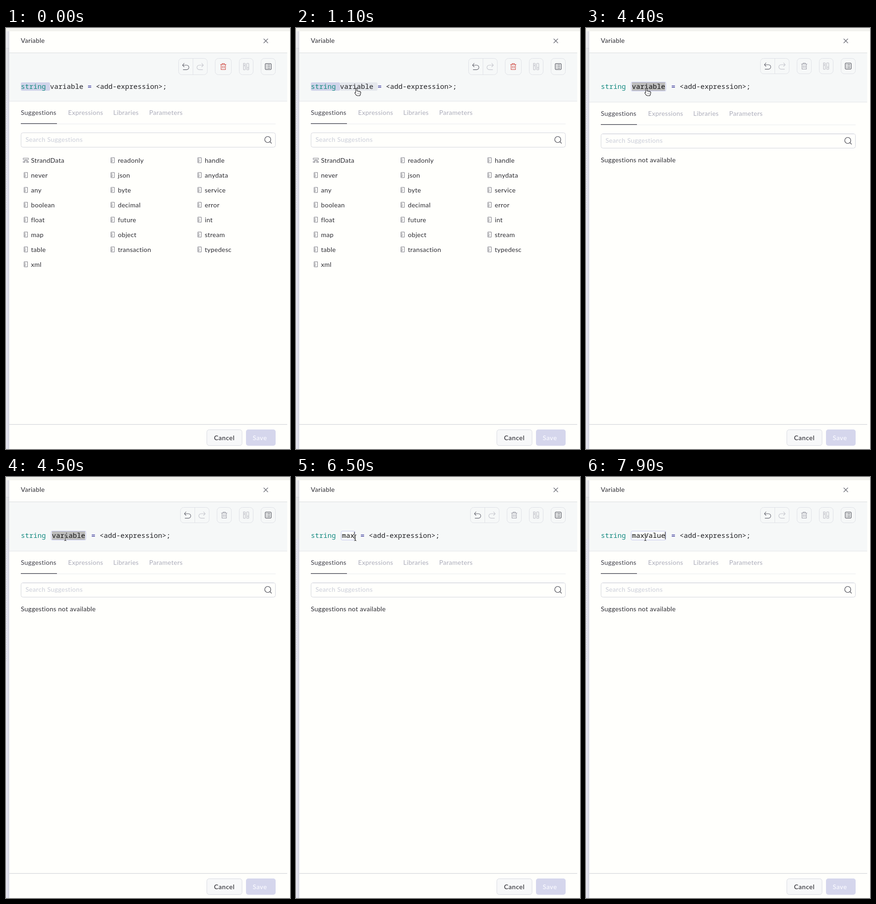
An HTML page for the animation above (8 s loop, 613 px wide and 906 px high).

```html
<!DOCTYPE html>
<html lang="en">
<head>
<meta charset="utf-8">
<title>Variable form</title>
<style>
  html, body { margin: 0; width: 100%; height: 100%; overflow: hidden; background: #fffffc; }
  svg { display: block; width: 100%; height: 100%; }
  text { font: 14px Lato, sans-serif; letter-spacing: .3px; white-space: pre; }
  .code { font: 15px "Noto Sans Mono", monospace; letter-spacing: 0; }
  .btn { font-weight: 500; letter-spacing: .5px; }
</style>
</head>
<body>
<svg id="stage" viewBox="0 0 613 906" xmlns="http://www.w3.org/2000/svg"></svg>
<script>
const LOOP = 8000;
const CELL = 9;
const stage = document.getElementById('stage');
const INK = '#2d2d33', NAVY = '#1c1a8c', TEAL = '#148a80';

const rect = (x, y, w, h, fill, extra = '') =>
  `<rect x="${x}" y="${y}" width="${w}" height="${h}" fill="${fill}" ${extra}/>`;
const frame = (x, y, w, h, r, fill, stroke) =>
  rect(x + .5, y + .5, w - 1, h - 1, fill, `rx="${r}" stroke="${stroke}"`);
const label = (x, y, s, fill = INK, cls = '') =>
  `<text x="${x}" y="${y}" fill="${fill}" class="${cls}">${s.replace(/</g, '&lt;')}</text>`;
const code = (x, y, s, fill = '#222226') => label(x, y, s, fill, 'code');
const path = (d, stroke, width = 1, fill = 'none') =>
  `<path d="${d}" stroke="${stroke}" stroke-width="${width}" fill="${fill}" stroke-linecap="round" stroke-linejoin="round"/>`;
const at = (x, y, s) => `<g transform="translate(${x} ${y})">${s}</g>`;

const typeNames = ('StrandData readonly handle never json anydata any byte service boolean decimal error ' +
  'float future int map object stream table transaction typedesc xml').split(' ');
const columns = [54, 241.5, 429];
const tabs = [[32, 'Suggestions'], [134, 'Expressions'], [231.5, 'Libraries'], [309, 'Parameters']];

const typeIcon = path('M-3.5-5.5h7v11h-7zM-3.5-2.5h2.5M-3.5 .5h3.5M-3.5 3h2.5', '#777780');
const recordIcon = path('M-5.5-4.5h11v3h-11zM0-1.5v2M-3.5 2.5v-1.500h7v1.500M-5.5 2.500h3.500v2.500h-3.500zM2 2.500h3.500v2.500h-3.500z', '#777780', .9);
const undoIcon = path('M-3.500-7l-3.500 4 3.500 3.500M-6.500-3H2a4.800 4.800 0 0 1 0 9.600H-5.500', 'currentColor', 1.1);
const trashIcon = path('M-6-4.500H6M-2.500-4.500v-2h5v2M-4.700-4.500v11h9.400v-11M-1.700-1.500v5M1.700-1.500v5', 'currentColor', 1.1);
const pairIcon = path('M-5.500-7h3a1 1 0 0 1 1 1v12a1 1 0 0 1-1 1h-2a1 1 0 0 1-1-1zM2.500-7h2.500a1 1 0 0 1 1 1v12a1 1 0 0 1-1 1h-2.500a1 1 0 0 1-1-1v-12a1 1 0 0 1 1-1M-3.500-4v3M4 1v3', '#bbbcc4', 1.1);
const listIcon = frame(-7, -7, 14, 14, 1.5, 'none', '#3c3d47') +
  path('M-4-3.500h1M-4 0h1M-4 3.500h1M-1-3.500h5M-1 0h5M-1 3.500h5', '#3c3d47', 1.1);
const tint = (color, s) => `<g color="${color}">${s}</g>`;

const cursors = {
  hand: path('M2.300 2c0-2 2.700-2 2.700 0V6.500l6 1.100c1.800.4 2.500 1.200 2.300 2.800l-.8 3.500c-.3 1.700-.9 2.900-2.500 2.900H6c-1.200 0-2-.7-2.700-1.600L.7 11.500c-.8-1.300.6-2.400 1.700-1.500L2.300 10z', '#1d1d1f', 1.1, '#fff') +
    path('M6.500 10.500v3M8.500 10.500v3M10.500 10.500v3', '#8a8a8e', .7),
  arrow: path('M0 0v14l3.200-3 2.200 5 2-.9-2.200-4.900H10z', '#fff', 1, '#1d1d1f'),
  beam: path('M-2 0Q0 0 0 1.500Q0 0 2 0M0 1.500V11M-2 12.500Q0 12.500 0 11Q0 12.500 2 12.500', '#fff', 2.6) +
    path('M-2 0Q0 0 0 1.500Q0 0 2 0M0 1.500V11M-2 12.500Q0 12.500 0 11Q0 12.500 2 12.500', '#151515', 1.1)
};

function backdrop() {
  let dots = '';
  for (let y = 135; y < 398; y += 5) dots += rect(0, y, 1, 1, '#c2c3d2');
  return `<defs><linearGradient id="edge"><stop stop-color="#8888a0" stop-opacity="0"/>
    <stop offset="1" stop-color="#8888a0" stop-opacity=".2"/></linearGradient></defs>` +
    rect(0, 0, 613, 906, '#fffffc') + rect(0, 0, 613, 7, '#f2f2ee') +
    rect(0, 7, 7, 37, '#f0f0f3') + rect(0, 43, 7, 90, '#e9eaec') + rect(0, 43, 7, 1, '#dddde2') +
    rect(0, 133, 7, 773, '#e9e9f2') + dots + rect(0, 7, 7, 899, 'url(#edge)') +
    label(32, 32, 'Variable') +
    path('M556.500 23.500l8.500 8.500M565 23.500l-8.500 8.500', '#6f7079', 1.4) +
    rect(7, 852.500, 600, 1.500, '#dcdde0') +
    frame(433, 864, 77, 35, 5, '#f7f8f9', '#d8dae2') + label(449, 887, 'Cancel', INK, 'btn') +
    rect(518, 864, 64, 35, '#d5d6ec', 'rx="5"') + label(532.500, 887, 'Save', '#fbfbff', 'btn');
}

function toolbar(canDelete) {
  const x = canDelete ? 372 : 376, h = canDelete ? 36 : 34, mid = 65 + h / 2;
  const box = (bx, w) => frame(bx, 65, w, h, 7, 'none', '#dfe1e6');
  return box(x, 63) + rect(x + 31, 65, 1, h, '#dfe1e6') +
    tint('#62636d', at(x + 16, mid, undoIcon)) +
    tint('#c3c4cb', at(x + 47, mid, `<g transform="scale(-1 1)">${undoIcon}</g>`)) +
    box(x + 79, canDelete ? 36 : 32) +
    tint(canDelete ? '#cf4a42' : '#9a9ba5', at(canDelete ? 469 : 471, mid, trashIcon)) +
    box(503, 31) + at(518, mid, pairIcon) + box(550, 32) + at(566, mid, listIcon);
}

function statement(s) {
  const y = s.shift < 0 ? 129 : 131;
  const picked = '#d1d4ea';
  let out = '', next = 176;
  if (s.field === null) {
    const typePicked = s.shift === 0;
    if (typePicked) out += rect(32, y - 14, 63, 18, picked, 'rx="3"');
    if (!typePicked || s.hover)
      out += rect(95, y - 14, 81, 18, typePicked ? '#e5e8ed' : '#d9dbee', 'rx="3"');
    out += code(95, y, 'variable');
  } else {
    const w = Math.max(15, s.field.length * CELL + 3);
    out += frame(97, 116, w + 1, 20, 2, '#fff', '#bfc2ec');
    if (s.selected) out += rect(99, 117, s.field.length * CELL, 18, '#bdbdbd');
    out += code(99, y, s.field, '#111');
    if (!s.selected) out += rect(98.500 + s.field.length * CELL, 118, 1, 16, '#000');
    next = 97 + w + 12;
  }
  return out + code(32, y, 'string', TEAL) + code(next, y, '=', NAVY) +
    code(next + 2 * CELL, y, '<add-expression>;');
}

function suggestions(hasList) {
  let out = tabs.map(([x, s], i) => label(x, 187, s, i ? '#acadbb' : '#40404b')).join('');
  out += rect(32, 206, 550, 1, '#e9eaee') + rect(32, 205, 78, 1.300, '#40404b') +
    frame(32, 225, 550, 32, 4, '#fffffc', '#d3d5dd') +
    label(42, 245, 'Search Suggestions', '#cbced9') +
    `<circle cx="565" cy="240" r="6.500" fill="none" stroke="#40404b" stroke-width="1.2"/>` +
    path('M569.800 244.800l3.200 3.200', '#40404b', 1.2);
  if (!hasList) return out + rect(33, 226, 548, 1, '#ebecf0') + label(32, 287, 'Suggestions not available');
  typeNames.forEach((name, i) => {
    const x = columns[i % 3], y = 285 + 32 * Math.floor(i / 3);
    out += at(x - 11, y - .5, i ? typeIcon : recordIcon) + label(x, y + 5, name);
  });
  return out;
}

// [time, characters typed]
const keys = [[6000, 1], [6300, 2], [6500, 3], [6900, 4], [7000, 5], [7400, 6], [7800, 7], [7900, 8]];

function stateAt(t) {
  const s = { shift: 0, field: null, selected: false, hover: false, cursor: '', x: 126.500, y: 129 };
  if (t >= 800 && t < 4400) {
    const left = Math.max(0, 1 - Math.floor((t - 800) / 100) / 3);
    s.y -= 35 * left * left;
    s.hover = t >= 900;
    s.cursor = s.hover ? 'hand' : 'arrow';
  }
  if (t >= 4300) s.shift = -2;
  if (t >= 4400) {
    s.shift = 2;
    s.field = 'variable';
    s.selected = true;
    s.cursor = t < 4500 || (t >= 6000 && t < 6300) ? 'hand' : 'beam';
    const key = keys.filter(k => k[0] <= t).pop();
    if (key) {
      s.field = 'maxValue'.slice(0, key[1]);
      s.selected = false;
    }
    if (s.cursor === 'beam') { s.x = 128; s.y = 124.500; }
  }
  return s;
}

let shown = '';
function draw(t) {
  const s = stateAt(t), id = JSON.stringify(s);
  if (id === shown) return;
  shown = id;
  const bottom = 157 + s.shift;
  stage.innerHTML = backdrop() +
    rect(7, 53, 600, bottom - 53, '#f6f8f8') + rect(7, 53, 600, 1, '#d9dcde') +
    rect(7, bottom, 600, 1, '#e2e4e7') +
    toolbar(s.shift === 0) + statement(s) +
    at(0, s.shift, suggestions(s.field === null)) +
    (s.cursor ? at(s.x, s.y, cursors[s.cursor]) : '');
}

const start = performance.now();
function tick() {
  draw((performance.now() - start) % LOOP);
  requestAnimationFrame(tick);
}
tick();
</script>
</body>
</html>
```
